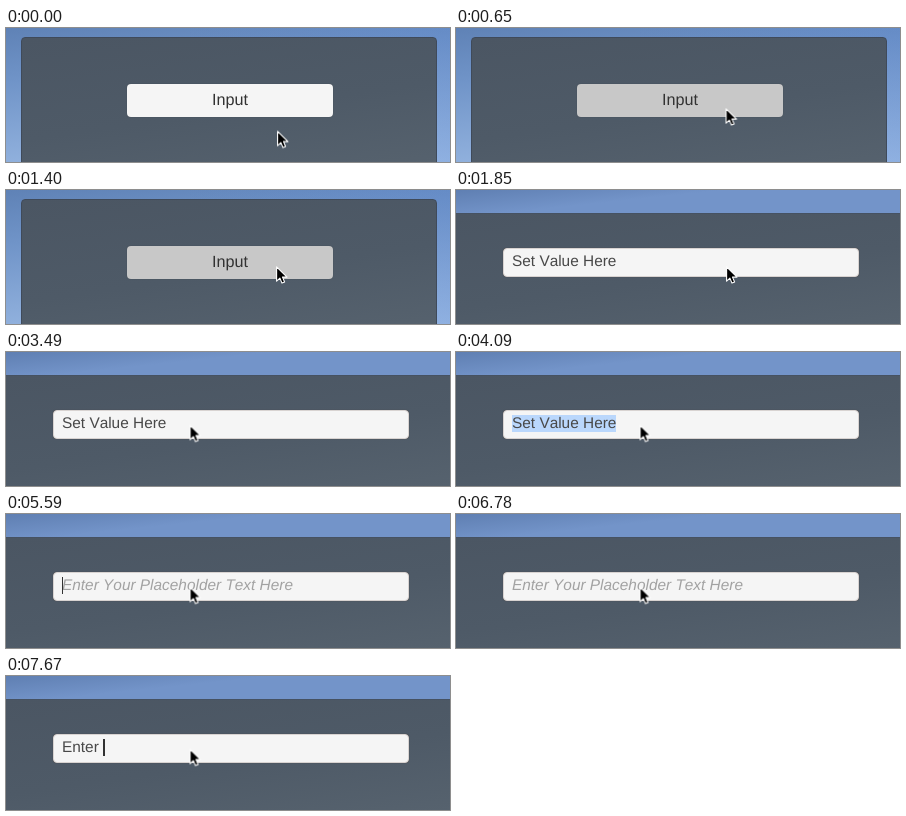
Write an HTML page that moves like this. It is 444x134 px and loops after 8000 ms.

```html
<!DOCTYPE html>
<html lang="en">
<head>
<meta charset="utf-8">
<title>Input field</title>
<style>
  html, body { margin: 0; width: 100%; height: 100%; overflow: hidden; }
  #stage {
    position: relative; width: 444px; height: 134px; overflow: hidden;
    font: 15.4px/17px "Liberation Sans", Arial, sans-serif;
    font-kerning: none; text-rendering: geometricPrecision;
    color: #484848; white-space: pre;
  }
  #stage *, #stage { box-sizing: border-box; }
  #stage div, svg { position: absolute; }
  .scene { inset: 0; }
  .scene, .scene *, #cursor { animation: 8s step-end infinite; }

  /* First view: a button on a panel */
  #menu {
    background:
      linear-gradient(90deg, #0000 40%, #4a78c838),
      linear-gradient(174deg, #5f82b6, #7094c8 30%, #a2c0e8);
    animation-name: menu;
  }
  #menu .panel {
    left: 15px; top: 9px; width: 416px; height: 130px;
    border: 1px solid #3f4a5a; border-radius: 4px;
    background: linear-gradient(172deg, #4b5663, #4e5a67 55%, #56626e);
  }
  #button {
    left: 121px; top: 56px; width: 206px; height: 33px;
    border-radius: 4px; background: #f5f5f5; color: #323232;
    box-shadow: 0 0 1px #39424c;
    font-size: 16.2px; line-height: 33px; text-align: center;
    animation-name: hover;
  }

  /* Second view: the text field */
  #form {
    background: linear-gradient(174deg, #5f7fb2, #7394c9 28px);
    animation-name: form;
  }
  #form .panel {
    left: 0; top: 23px; width: 444px; height: 111px;
    border-top: 1px solid #465262;
    background: linear-gradient(172deg, #4b5663, #4e5a67 55%, #56626e);
  }
  #field {
    left: 47px; top: 58px; width: 356px; height: 29px;
    border: 1px solid #d8d3d1; border-radius: 4px; background: #f5f5f5;
    box-shadow: 0 0 1px #49403f;
    animation-name: press;
  }
  #form .text { left: 56px; top: 63px; height: 17px; }
  #value { animation-name: value; }
  #hint { color: #a2a2a2; font-style: italic; animation-name: hint; }
  #typed {
    overflow: hidden; box-sizing: content-box !important;
    border-right: 1px solid #323232; animation-name: type;
  }

  #cursor { left: 0; top: 0; overflow: visible; animation-name: move; }

  @keyframes menu { 0% { visibility: visible } 23.125%, 100% { visibility: hidden } }
  @keyframes form { 0% { visibility: hidden } 23.125%, 100% { visibility: visible } }
  @keyframes hover { 0% { background: #f5f5f5 } 8.125%, 100% { background: #c8c8c8 } }
  @keyframes press {
    0% { background: #f5f5f5; border-color: #d8d3d1 }
    49.25% { background: #c8c8c8; border-color: #b5b0ae }
    51.125%, 100% { background: #f5f5f5; border-color: #d8d3d1 }
  }
  @keyframes value {
    0% { background: #0000; opacity: 1 }
    51.125% { background: #bad7fc; opacity: 1 }
    69.875%, 100% { background: #0000; opacity: 0 }
  }
  @keyframes hint {
    0% { opacity: 0 }
    69.875% { opacity: 1 }
    86.625%, 100% { opacity: 0 }
  }
  /* The right border is the caret */
  @keyframes type {
    0% { width: 0; border-color: #0000 }
    69.875% { width: 0; border-color: #323232 }
    71.75% { width: 0; border-color: #0000 }
    79.25% { width: 0; border-color: #323232 }
    84.75% { width: 0; border-color: #0000 }
    86.625% { width: .667em; border-color: #323232 }
    88.5% { width: 1.223em; border-color: #323232 }
    90.375% { width: 1.501em; border-color: #323232 }
    94% { width: 2.39em; border-color: #323232; border-right-width: 1px }
    95.875%, 100% { width: 2.668em; border-color: #323232; border-right-width: 2px }
  }
  @keyframes move {
    0% { transform: translate(271px, 102.5px) }
    6.25% { transform: translate(269.5px, 90.5px) }
    8.125% { transform: translate(269.5px, 80px) }
    10% { transform: translate(270px, 77px) }
    11.875% { transform: translate(270px, 76px) }
    34.375% { transform: translate(270px, 75.5px) }
    36.25% { transform: translate(259px, 74px) }
    38.125% { transform: translate(242px, 74px) }
    39.875% { transform: translate(205px, 73px) }
    41.75% { transform: translate(194px, 73px) }
    43.625%, 100% { transform: translate(183.5px, 72.5px) }
  }
</style>
</head>
<body>
<div id="stage">
  <div id="menu" class="scene">
    <div class="panel"></div>
    <div id="button">Input</div>
  </div>
  <div id="form" class="scene">
    <div class="panel"></div>
    <div id="field"></div>
    <div id="value" class="text">Set Value Here</div>
    <div id="hint" class="text">Enter Your Placeholder Text Here</div>
    <div id="typed" class="text">Enter </div>
  </div>
  <svg id="cursor" width="12" height="18">
    <path d="M.6 .9V15.2L3.9 12.1L6 17.1L8.6 16L6.5 11.1H11Z"
          fill="#000" stroke="#fff" stroke-width="1.1" stroke-linejoin="round"/>
  </svg>
</div>
</body>
</html>
```
